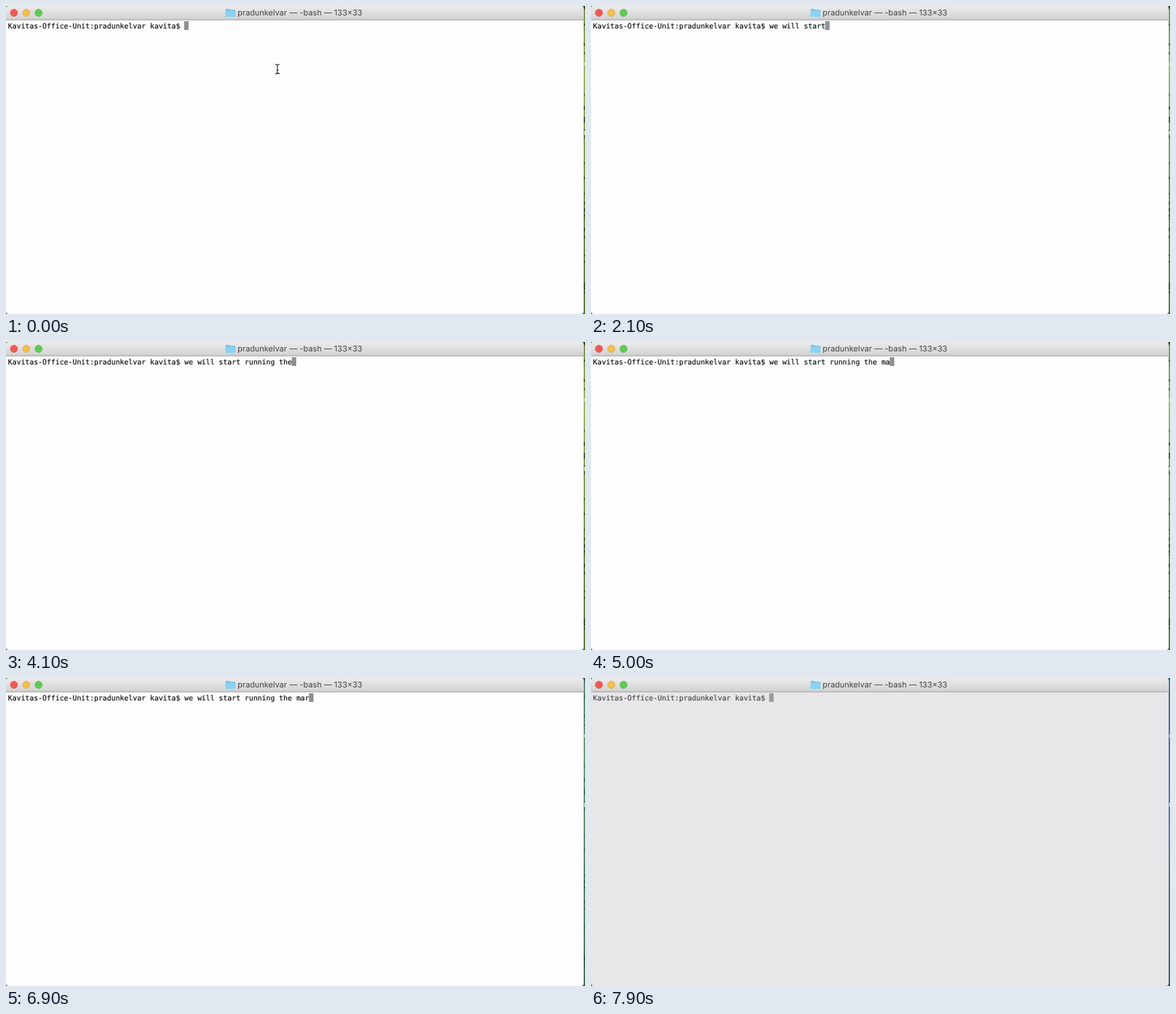
Write an HTML page that moves like this. It is 800 px wide and 425 px high and loops after 8 s.

```html
<!DOCTYPE html>
<html lang="en">
<head>
<meta charset="utf-8">
<title>Terminal typing</title>
<style>
  html, body { margin: 0; width: 100%; height: 100%; overflow: hidden; }
  svg { display: block; width: 100vw; height: 100vh; }
  text { text-rendering: geometricPrecision; white-space: pre; }
  .mono { font: 9.88px "DejaVu Sans Mono", monospace; fill: #000; stroke: #000; stroke-width: .1px; }
  .title { font: 11px Inter, sans-serif; fill: #454545; }
</style>
</head>
<body>
<svg viewBox="0 0 800 425">
  <defs>
    <linearGradient id="bar" x2="0" y2="1">
      <stop stop-color="#ececec"/><stop offset="1" stop-color="#d1d1d1"/>
    </linearGradient>
    <linearGradient id="leaves" x2="0" y2="1">
      <stop stop-color="#5d7a33"/><stop offset=".2" stop-color="#93b04c"/>
      <stop offset=".45" stop-color="#6f8f38"/><stop offset="1" stop-color="#48682a"/>
    </linearGradient>
    <linearGradient id="sea" x2="0" y2="1">
      <stop stop-color="#1f5f86"/><stop offset=".5" stop-color="#2a7590"/><stop offset="1" stop-color="#1d5262"/>
    </linearGradient>
    <clipPath id="frame"><rect width="798.3" height="425" rx="4"/></clipPath>
  </defs>

  <rect width="800" height="425" fill="url(#sea)"/>
  <g id="forest"><rect width="800" height="425" fill="url(#leaves)"/></g>
  <path d="M799 78h1v4h-1zM799 172h1v6h-1z" fill="#d5dcd8"/>

  <g clip-path="url(#frame)">
    <rect id="page" width="799" height="425" fill="#fefdfe"/>
    <rect width="799" height="19" fill="url(#bar)"/>
    <rect y="18.500" width="799" height="1.200" fill="#a9a9a9"/>
    <g stroke-width=".6">
      <circle cx="11" cy="9.4" r="5" fill="#ed5a56" stroke="#d04a47"/>
      <circle cx="28" cy="9.4" r="5" fill="#f2be4e" stroke="#d6a23c"/>
      <circle cx="45" cy="9.4" r="5" fill="#5fcb52" stroke="#4dac43"/>
    </g>
    <path d="M303.5 5q0-1 1-1h4l1.2 1.2h6.3q1 0 1 1V14q0 1-1 1h-11.500q-1 0-1-1z" fill="#7cc6ea"/>
    <path d="M303.500 7h13.500v7q0 1-1 1h-11.500q-1 0-1-1z" fill="#8ad1f2"/>
    <text class="title" x="320" y="13.400" id="folder"></text>
    <text class="title" x="492.300" y="13.400" text-anchor="end">— -bash — 133×33</text>

    <rect id="caret" y="21" width="6.200" height="12"/>
    <text class="mono" id="line" x="2.800" y="30.800"></text>
  </g>
  <path id="pointer" d="M372 80.500q3 0 3 2q0-2 3-2M375 82v10M372 93.500q3 0 3-2q0 2 3 2M373.500 88.500h3" fill="none" stroke="#222" stroke-width="1.100"/>
</svg>

<script>
const LOOP = 8000, TICK = 100, CELL = 9.88 * 0.602, CARET_LEFT = 2.3;
const folder = "pradunkelvar";
const prompt = `Kavitas-Office-Unit:${folder} kavita$ `;
const el = id => document.getElementById(id);

// Keystrokes as [time, key]; "<" is backspace.
const strokes = [];
const type = (start, keys, gap = TICK) =>
  [...keys].forEach((key, i) => strokes.push([start + i * gap, key]));

type(100, "we w");
type(600, "ill s");
type(1200, "a");
type(1600, "<ta");
type(2000, "rt");
type(2500, " ");
type(2700, "runnin ");
type(3600, "<g the ");
type(4500, "m");
type(5000, "a");
type(5200, "rta");
type(5500, "ho", 0);
type(5800, "<<<<a", 0);
type(6100, "tho");
type(6500, "n");
type(6750, "<".repeat(34), 32);

const typedAt = t => strokes.reduce((text, [at, key]) =>
  at > t ? text : key === "<" ? text.slice(0, -1) : text + key, "");

const clamp = v => Math.min(1, Math.max(0, v));

function addShadows() {
  let seed = 7;
  const random = () => (seed = seed * 16807 % 2147483647) / 2147483647;
  let d = "";
  for (let i = 0; i < 32; i++) d += `M798 ${(random() * 420).toFixed(1)}h2v${(1 + random() * 4).toFixed(1)}h-2z`;
  el("forest").insertAdjacentHTML("beforeend", `<path d="${d}" fill="#1c2815" opacity=".75"/>`);
}

function draw(now) {
  const t = Math.floor(now % LOOP / TICK) * TICK;
  const text = prompt + typedAt(t);
  const bell = t >= 7900;
  el("line").textContent = text;
  el("line").setAttribute("opacity", bell ? 0.75 : 1);
  el("caret").setAttribute("x", CARET_LEFT + text.length * CELL);
  el("caret").setAttribute("fill", bell ? "#9b9a9d" : "#908f93");
  el("page").setAttribute("fill", bell ? "#e8e6e9" : "#fefdfe");
  el("pointer").setAttribute("visibility", t < 100 ? "visible" : "hidden");
  el("forest").setAttribute("opacity", 1 - clamp((t - 6100) / 1600));
  requestAnimationFrame(draw);
}

el("folder").textContent = folder;
addShadows();
draw(performance.now());
</script>
</body>
</html>
```
